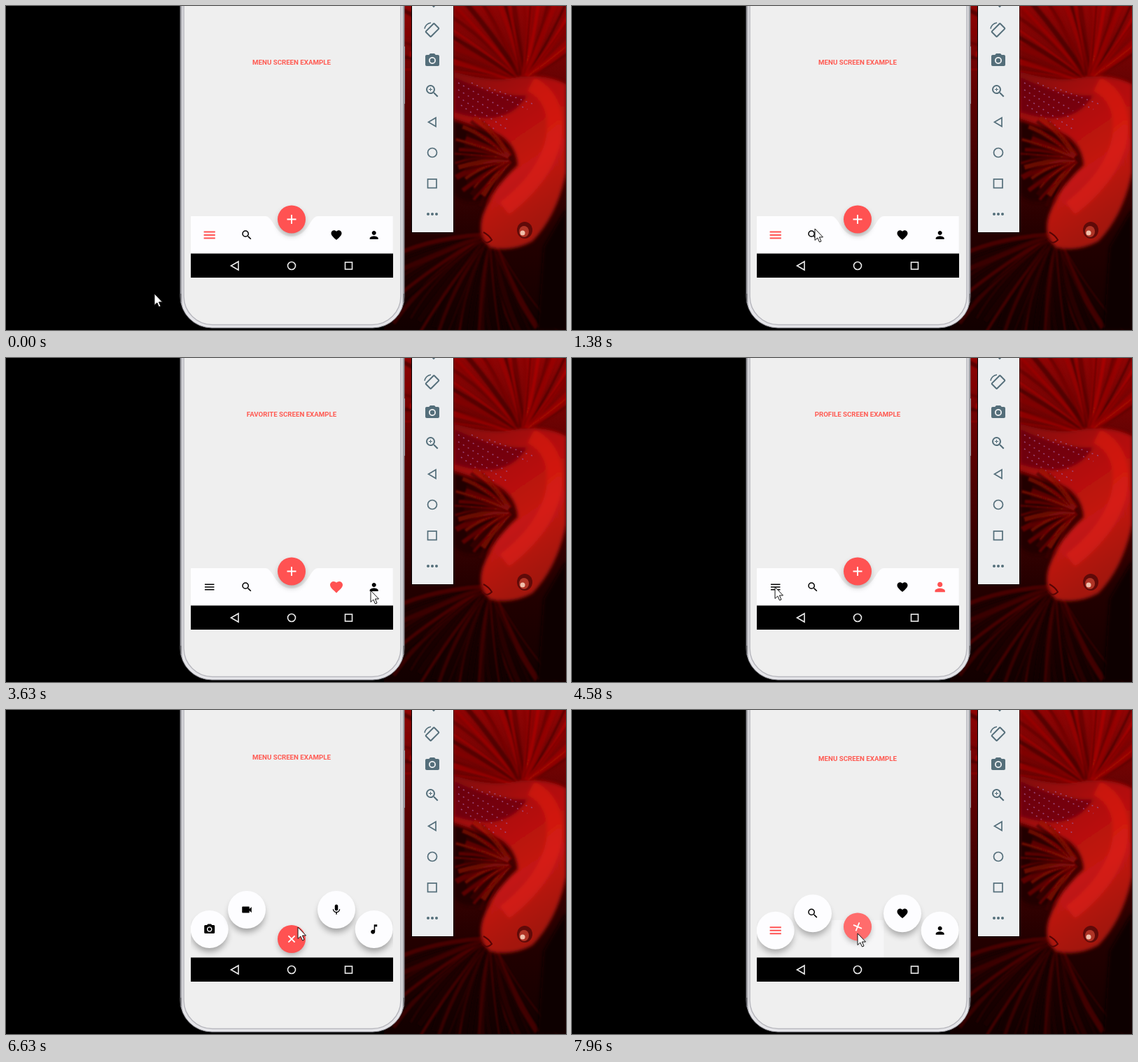
Write an HTML page that moves like this. It is 800 by 464 pixels and loops after 8 s.

```html
<!DOCTYPE html>
<html lang="en">
<head>
<meta charset="utf-8">
<style>
  html, body { margin: 0; width: 100%; height: 100%; overflow: hidden; background: #000; }
  svg { display: block; width: 100vw; height: 100vh; }
  #title { font: 700 9.7px Roboto, sans-serif; fill: #ff5a52; text-anchor: middle; }
</style>
</head>
<body>
<svg viewBox="0 0 800 464" xmlns="http://www.w3.org/2000/svg">
  <defs>
    <linearGradient id="water" x2="0" y2="1">
      <stop offset="0" stop-color="#8e0404"/><stop offset=".3" stop-color="#5a0202"/>
      <stop offset=".7" stop-color="#240000"/><stop offset="1" stop-color="#120000"/>
    </linearGradient>
    <linearGradient id="body" x1="0" y1="0" x2=".45" y2="1">
      <stop offset="0" stop-color="#7c0608"/><stop offset=".4" stop-color="#b00c0a"/>
      <stop offset=".7" stop-color="#c41812"/><stop offset="1" stop-color="#a41410"/>
    </linearGradient>
    <linearGradient id="frame">
      <stop offset="0" stop-color="#8c8c92"/><stop offset=".012" stop-color="#e6e6ea"/>
      <stop offset=".988" stop-color="#e6e6ea"/><stop offset="1" stop-color="#8c8c92"/>
    </linearGradient>
    <filter id="haze"><feGaussianBlur stdDeviation="1"/></filter>
    <filter id="soft"><feGaussianBlur stdDeviation="2.5"/></filter>
    <filter id="blur" x="-50%" y="-50%" width="200%" height="200%"><feGaussianBlur stdDeviation="5"/></filter>
    <clipPath id="photoClip"><path d="M568 0H800V464H540Z"/></clipPath>
    <clipPath id="screen"><rect x="264" y="0" width="289" height="355"/></clipPath>
  </defs>
  <rect width="800" height="464"/>

  <g clip-path="url(#photoClip)">
    <rect x="540" width="260" height="464" fill="url(#water)"/>
    <g id="fins" fill="none" filter="url(#haze)"></g>
    <g filter="url(#soft)">
      <path d="M640 165Q700 182 718 200L700 270Q660 290 640 270Z" fill="#200000"/>
      <path d="M768 345L800 290V464H760Z" fill="#0c0000"/>
      <path d="M630 90Q690 112 735 101Q775 98 800 112V238Q788 300 752 337Q722 353 692 346Q672 330 681 300Q694 262 731 228Q728 190 690 178Q660 168 630 158Z" fill="url(#body)"/>
      <path d="M750 112Q795 135 780 200Q765 250 712 290" fill="none" stroke="#e82014" stroke-width="22" opacity=".5"/>
      <path d="M640 102Q700 130 745 128Q715 178 640 152Z" fill="#5c0408" opacity=".65"/>
    </g>
    <path d="M646 110L716 150M646 120L720 165M646 130L715 176M650 142L700 178M665 110L745 148M690 117L752 140" stroke="#a05088" stroke-width="1.6" stroke-dasharray="2 6" opacity=".85"/>
    <g id="sideFin" fill="none" filter="url(#haze)"></g>
    <path d="M682 324q8 4 12 11q-8 8-14-1" fill="none" stroke="#580404" stroke-width="2"/>
    <ellipse cx="741" cy="321" rx="11" ry="12" fill="#600a08"/>
    <ellipse cx="740" cy="323" rx="7" ry="8" fill="#b03426"/>
    <circle cx="738" cy="325" r="3.500" fill="#f0c0ac"/>
  </g>

  <!-- phone -->
  <path d="M568 58h2v82h-2z" fill="#c4c4c8"/>
  <rect x="249" y="-80" width="320" height="541" rx="45" fill="url(#frame)" stroke="#85858c"/>
  <rect x="254" y="-80" width="310" height="536.500" rx="41" fill="#efefef" stroke="#b8b8be" stroke-width="1.500"/>
  <path d="M249.500 412v12M568.500 412v12" stroke="#5c5c62" stroke-width="1.500"/>

  <!-- emulator toolbar -->
  <rect x="579" y="-2" width="60.500" height="326.500" fill="#000"/>
  <rect x="580" y="0" width="59" height="324" fill="#eceef0"/>
  <g fill="none" stroke="#546e7a" stroke-width="1.700">
    <path d="M609 -1h4l-2 2z"/>
    <g transform="translate(609 34.500)">
      <rect x="-5.200" y="-8.500" width="10.400" height="17" rx="1" transform="rotate(45)" stroke-width="2"/>
      <path d="M-11 -2A11 11 0 0 1 -2 -10.500"/>
    </g>
    <path d="M614 160v12.500l-10.500-6.250z"/>
    <circle cx="609" cy="210" r="6.500"/>
    <rect x="602.500" y="248" width="12.500" height="12.500"/>
  </g>
  <g id="tools" fill="#546e7a">
    <circle cx="603" cy="298" r="2"/><circle cx="609" cy="298" r="2"/><circle cx="615" cy="298" r="2"/>
  </g>

  <!-- app -->
  <text id="title" x="408"></text>
  <g clip-path="url(#screen)">
    <path id="center" fill="#fdfdff"/>
    <g id="tabs"></g>
    <g id="fab">
      <circle cy="4" r="18" filter="url(#blur)" opacity=".35"/>
      <circle r="20" fill="#ff5252"/>
      <circle id="flash" r="20" fill="#fff"/>
      <path id="plus" d="M-6.500 0H6.500M0 -6.500V6.500" stroke="#fff" stroke-width="1.800"/>
    </g>
  </g>
  <rect x="264" y="354.500" width="289" height="34.500"/>
  <g fill="none" stroke="#ececec" stroke-width="1.600">
    <path d="M332 366v12l-10.500-6z"/><circle cx="408" cy="372" r="5.500"/>
    <rect x="484.500" y="367" width="10" height="10"/>
  </g>
  <path id="cursor" d="M0 0V16.500L3.800 13L6.500 19L9 18L6.400 12H11.500Z" fill="#fff" stroke="#111" stroke-width="1"/>
</svg>

<script>
const LOOP = 8000;
const $ = id => document.getElementById(id);
const clamp = v => Math.max(0, Math.min(1, v));
const mix = (a, b, u) => a + (b - a) * u;
const smooth = u => u * u * (3 - 2 * u);

function add(parent, tag, attrs) {
  const el = document.createElementNS('http://www.w3.org/2000/svg', tag);
  set(el, attrs);
  parent.append(el);
  return el;
}
function set(el, attrs) {
  for (const name in attrs) el.setAttribute(name, attrs[name]);
}

const LENS = 'M15.5 14h-.79l-.28-.27A6.47 6.47 0 0 0 16 9.5 6.5 6.5 0 1 0 9.5 16c1.61 0 3.09-.59 4.23-1.57l.27.28v.79l5 4.99L20.49 19zm-6 0C7.01 14 5 11.99 5 9.5S7.01 5 9.5 5 14 7.01 14 9.5 11.99 14 9.5 14z';
const CAMERA = 'M9 2L7.17 4H4c-1.1 0-2 .9-2 2v12c0 1.1.9 2 2 2h16c1.1 0 2-.9 2-2V6c0-1.1-.9-2-2-2h-3.17L15 2zm3 15c-2.76 0-5-2.24-5-5s2.24-5 5-5 5 2.24 5 5-2.24 5-5 5zM12 8.8a3.2 3.2 0 1 0 0 6.4a3.2 3.2 0 1 0 0-6.4z';
const MENU = 'M3 18h18v-2H3zm0-5h18v-2H3zm0-7v2h18V6z';
const HEART = 'M12 21.35l-1.45-1.32C5.4 15.36 2 12.28 2 8.5 2 5.42 4.42 3 7.5 3c1.74 0 3.41.81 4.5 2.09C13.09 3.81 14.76 3 16.5 3 19.58 3 22 5.42 22 8.5c0 3.78-3.4 6.86-8.55 11.54z';
const PERSON = 'M12 12c2.21 0 4-1.79 4-4s-1.79-4-4-4-4 1.79-4 4 1.79 4 4 4zm0 2c-2.67 0-8 1.34-8 4v2h16v-2c0-2.66-5.33-4-8-4z';
const VIDEO = 'M17 10.5V7c0-.55-.45-1-1-1H4c-.55 0-1 .45-1 1v10c0 .55.45 1 1 1h12c.55 0 1-.45 1-1v-3.5l4 4v-11z';
const MIC = 'M12 14c1.66 0 3-1.34 3-3V5c0-1.66-1.34-3-3-3S9 3.34 9 5v6c0 1.66 1.34 3 3 3zm5.3-3c0 3-2.54 5.1-5.3 5.1S6.7 14 6.7 11H5c0 3.41 2.72 6.23 6 6.72V21h2v-3.28c3.28-.48 6-3.3 6-6.72z';
const NOTE = 'M12 3v10.55c-.59-.34-1.27-.55-2-.55-2.21 0-4 1.79-4 4s1.79 4 4 4 4-1.79 4-4V7h4V3z';

const place = (x, y, scale) => `translate(${x} ${y}) scale(${scale}) translate(-12 -12)`;
add($('tools'), 'path', { d: CAMERA, transform: place(609, 78, 1), 'fill-rule': 'evenodd' });
add($('tools'), 'path', { d: LENS + 'M12 10h-2v2H9v-2H7V9h2V7h1v2h2z', transform: place(609, 122, 1) });

// Fin rays spread between two angles, in degrees.
function fan(parent, cx, cy, inner, outer, from, to, count, colors) {
  for (let i = 0; i < count; i++) {
    const a = mix(from, to, i / (count - 1)) * Math.PI / 180;
    const r = outer * (0.9 + 0.1 * Math.sin(i * 2.3));
    const bend = 0.1 + 0.08 * Math.sin(i * 1.7);
    const at = (d, turn) => `${cx + d * Math.cos(a + turn)} ${cy + d * Math.sin(a + turn)}`;
    add(parent, 'path', {
      d: `M${at(inner, 0)}Q${at(r * .6, bend)} ${at(r, 0)}`,
      stroke: colors[i % colors.length], 'stroke-width': 2 + i * 3 % 7, opacity: .6
    });
  }
}
fan($('fins'), 740, 108, 8, 210, 185, 325, 34, ['#a00606', '#380000', '#b80a08', '#5c0202', '#860404']);
fan($('fins'), 690, 325, 10, 190, 55, 165, 28, ['#4c0202', '#100000', '#600404', '#200000', '#340000']);
fan($('sideFin'), 722, 218, 4, 84, 118, 232, 25, ['#800808', '#3c0202', '#980c0a']);

const tabs = [
  [290.7, 14, MENU, CAMERA, 'MENU'],
  [344, 42, LENS, VIDEO, 'SEARCH'],
  [472, 42, HEART, MIC, 'FAVORITE'],
  [525.7, 14, PERSON, NOTE, 'PROFILE']
].map(([x, lift, icon, action, label]) => {
  const group = add($('tabs'), 'g', {});
  return {
    x, lift, label, group,
    shadow: add(group, 'circle', { cy: 7, r: 25, filter: 'url(#blur)' }),
    plate: add(group, 'rect', { x: -27, y: -27, width: 54, height: 54, fill: '#fdfdff' }),
    icon: add(group, 'path', { d: icon }),
    action: add(group, 'path', { d: action, transform: place(0, 0, .75), 'fill-rule': 'evenodd' })
  };
});

const picks = [[-1000, 0], [1450, 1], [2700, 2], [3720, 3], [4700, 0]];   // time, tab
const stops = [   // time, x, y
  [0, 212, 412], [300, 212, 412], [1250, 347, 319], [1700, 347, 319], [2380, 490, 310],
  [2460, 490, 310], [2620, 470, 325], [3000, 470, 325], [3520, 521, 333], [3900, 521, 333],
  [4580, 290, 328], [4880, 290, 328], [5420, 395, 307], [5800, 395, 307], [6450, 417, 311],
  [6750, 417, 311], [7250, 408, 320], [8000, 408, 320]
];

function cursorAt(t) {
  const i = Math.max(1, stops.findIndex(s => s[0] > t));
  const [t0, x0, y0] = stops[i - 1], [t1, x1, y1] = stops[i];
  const u = smooth(clamp((t - t0) / (t1 - t0)));
  return [mix(x0, x1, u), mix(y0, y1, u)];
}

function draw(t) {
  const ramp = start => clamp((t - start) / 1000);
  const open = ramp(5580) - ramp(7460);
  const rise = 1 - (1 - open) ** 3;
  const drop = open ** 2.2;
  const now = picks.findLastIndex(p => p[0] <= t);
  const selected = picks[now][1];
  const previous = now ? picks[now - 1][1] : selected;
  const change = clamp((t - picks[now][0]) / 200);

  $('title').textContent = tabs[selected].label + ' SCREEN EXAMPLE';
  set($('title'), { y: 83.6 - 13 * (1 - (1 - open) ** 2.3) });

  tabs.forEach((tab, i) => {
    const on = i === selected ? (previous === selected ? 1 : change) : i === previous ? 1 - change : 0;
    const swap = clamp((open - .5) / .3);
    set(tab.group, { transform: `translate(${tab.x} ${328 - tab.lift * rise})` });
    set(tab.shadow, { opacity: .34 * rise });
    set(tab.plate, { rx: 27 * clamp(rise * 1.2) });
    set(tab.icon, {
      transform: place(0, 0, mix(.75, .9, on)), opacity: 1 - swap,
      fill: `rgb(${255 * on},${82 * on},${82 * on})`
    });
    set(tab.action, { opacity: swap });
  });

  const bottom = 301 + 29 * (1 - clamp(open * 2));
  set($('center'), {
    d: `M370.500 355V301C382 301 384 ${bottom} 408 ${bottom}S434 301 445.500 301V355Z`,
    opacity: 1 - open
  });
  set($('fab'), { transform: `translate(408 ${305.5 + 22.5 * drop})` });
  set($('flash'), { opacity: .15 * Math.sin(Math.PI * open) });
  set($('plus'), { transform: `rotate(${45 * open})` });
  set($('cursor'), { transform: `translate(${cursorAt(t)})` });
}

const start = performance.now();
function tick() {
  draw((performance.now() - start) % LOOP);
  requestAnimationFrame(tick);
}
tick();
</script>
</body>
</html>
```
